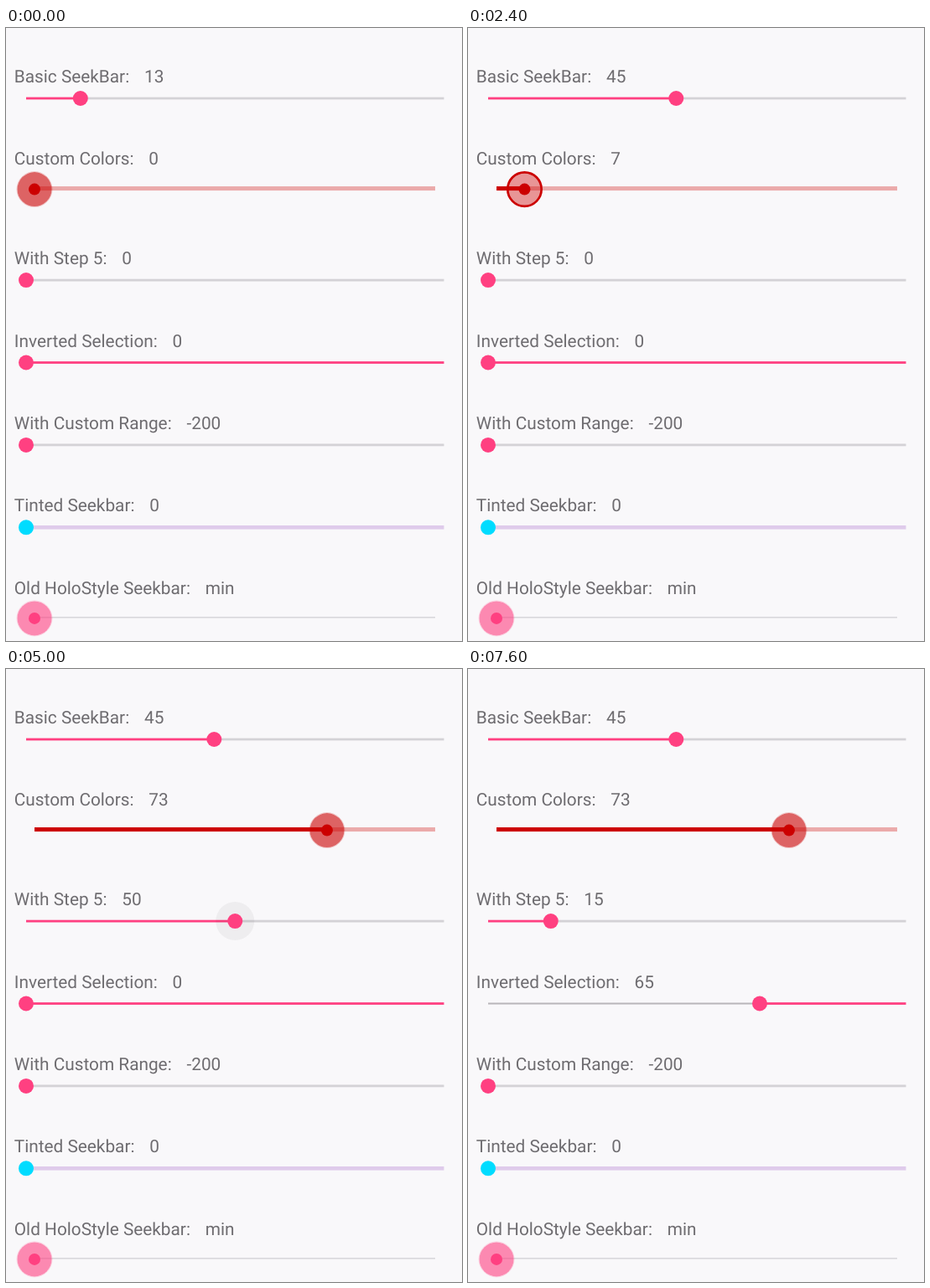
Animation, 544 px wide and 732 px high, one loop 8 s. Source, as an HTML page with a canvas:

```html
<!DOCTYPE html>
<html lang="en">
<head>
<meta charset="utf-8">
<style>
  html, body { margin: 0; overflow: hidden; background: #f9f8fa; }
  canvas { display: block; }
</style>
</head>
<body>
<canvas id="stage" width="544" height="732"></canvas>
<script>
const ctx = document.getElementById('stage').getContext('2d');
const LOOP = 8000, TICK = 200, RELEASE = 400;
const PINK = '#ff4081', GREY = '#d4d2d6';
const clamp = v => Math.max(0, Math.min(1, v));
const easeOut = k => 1 - (1 - k) ** 2;

// A drag eases between two values; a tap jumps straight to one.
const drag = (start, end, from, to, down = start) => ({ start, end, from, to, down });
const tap = (start, to) => ({ start, end: start, from: to, to, down: start });

const rows = [
  { name: 'Basic SeekBar:', touches: [drag(0, 600, 13, 45)] },
  { name: 'Custom Colors:', touches: [drag(2400, 2800, 7, 27), tap(3400, 73)],
    halo: '204,0,0', right: '#ebaaaa', height: 5 },
  { name: 'With Step 5:', touches: [tap(5000, 50), drag(6800, 7200, 40, 15, 6600)], step: 5 },
  { name: 'Inverted Selection:', touches: [tap(5800, 65)],
    left: '#b8b6ba', right: PINK, leftHeight: 2 },
  { name: 'With Custom Range:', text: '-200' },
  { name: 'Tinted Seekbar:', right: '#dfcbeb', height: 4.6, thumb: '#00dcff' },
  { name: 'Old HoloStyle Seekbar:', text: 'min', halo: '255,64,129', right: '#c6c4c8', height: 1 }
];

function valueOf(touch, step) {
  if (!touch) return 0;
  const { start, end, from, to, t } = touch;
  const k = end > start ? clamp((t - start) / (end - start)) : 1;
  return Math.round((from + (to - from) * easeOut(k)) / step) * step;
}

// How far a dragged thumb has grown, 0 to 1.
const growth = ({ down, end, t }) =>
  Math.min(clamp((t - down) / TICK), clamp(1 - (t - end) / RELEASE));

function label(name, value, baseline) {
  ctx.font = '20.8px Roboto, sans-serif';
  ctx.textRendering = 'geometricPrecision';
  ctx.fillStyle = '#6e6c70';
  ctx.fillText(name, 9.8, baseline);
  ctx.fillText(value, 27.6 + ctx.measureText(name).width, baseline);
}

function bar(x1, x2, y, height, color) {
  ctx.fillStyle = color;
  ctx.fillRect(x1, y - height / 2, x2 - x1, height);
}

function disc(x, y, r, color) {
  ctx.fillStyle = color;
  ctx.beginPath();
  ctx.arc(x, y, r, 0, 2 * Math.PI);
  ctx.fill();
}

function ring(x, y, r, width, color) {
  disc(x, y, 0, color);
  ctx.strokeStyle = color;
  ctx.lineWidth = width;
  ctx.beginPath();
  ctx.arc(x, y, r, 0, 2 * Math.PI);
  ctx.stroke();
}

function plainThumb(x, y, color, touch) {
  const isTap = touch && touch.start === touch.end;
  const grown = touch && !isTap ? growth(touch) : 0;
  const ripple = isTap ? Number(touch.t < touch.end + TICK) : grown;
  disc(x, y, 23, `rgba(0,0,0,${0.045 * ripple})`);
  disc(x, y, 9 + 2 * grown, color);
}

function haloThumb(x, y, rgb, touch) {
  const pressed = touch && touch.t < touch.end + RELEASE;
  disc(x, y, 20.5, `rgba(${rgb},${pressed ? 0.4 : 0.6})`);
  if (pressed) ring(x, y, 20.2, 2.7, `rgb(${rgb})`);
  else ring(x, y, 21, 1, `rgba(${rgb},0.2)`);
  disc(x, y, 7, `rgb(${rgb})`);
}

function drawRow(row, t, baseline) {
  const { name, touches = [], step = 1, halo, height = 2.8, leftHeight = height,
          left = halo ? `rgb(${halo})` : PINK, right = GREY, thumb = PINK } = row;
  const latest = touches.filter(touch => touch.down <= t).pop();
  const moving = touches.filter(touch => touch.start <= t).pop();
  const value = valueOf(moving && { ...moving, t }, step);
  const touch = latest && { ...latest, t };
  const [x1, x2, y] = halo ? [34, 512, baseline + 28.2] : [24, 522.5, baseline + 19];
  const x = x1 + (x2 - x1) * value / 100;

  label(name, row.text || value, baseline);
  bar(x1, x, y, leftHeight, left);
  bar(x, x2, y, height, right);
  if (halo) haloThumb(x, y + 1, halo, touch);
  else plainThumb(x, y, thumb, touch);
}

function draw(t) {
  ctx.fillStyle = '#f9f8fa';
  ctx.fillRect(0, 0, 544, 732);
  let baseline = 65;
  for (const row of rows) {
    drawRow(row, t, baseline);
    baseline += row.halo ? 118.7 : 98.4;
  }
}

// The picture advances in whole ticks, five a second.
function frame(now) {
  draw(Math.floor(now % LOOP / TICK) * TICK);
  requestAnimationFrame(frame);
}
requestAnimationFrame(frame);
</script>
</body>
</html>
```
